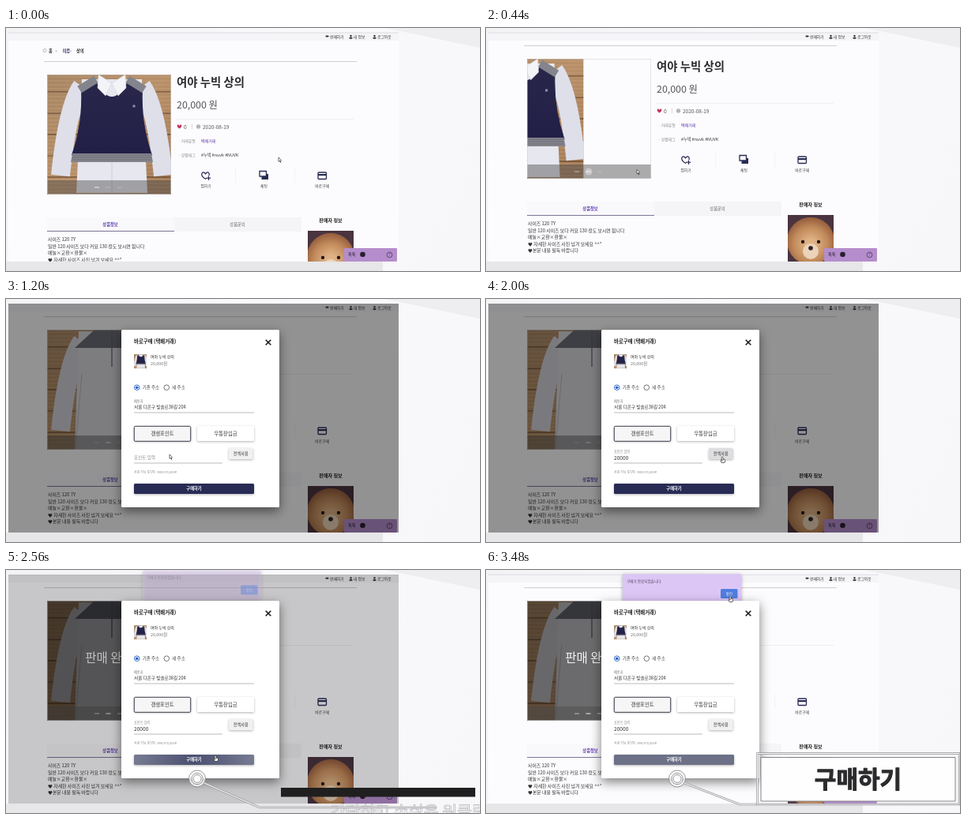
Animation of 600 by 308 pixels, one loop 3.52 s. Source, as an HTML page with a canvas:

```html
<!DOCTYPE html>
<html lang="ko">
<head>
<meta charset="utf-8">
<style>
html, body { margin: 0; width: 100%; height: 100%; overflow: hidden; background: #f7f6f8; }
canvas { display: block; }
</style>
</head>
<body>
<canvas id="stage" width="600" height="308"></canvas>
<script>
const ctx = document.getElementById('stage').getContext('2d');
const LOOP = 3520, STEP = 40;
const NAVY = '#282b54', PURPLE = '#5f3dae', PAPER = '#fcfbfd', INK = '#333', FAINT = '#efeef2';
const PHOTO = { x: 52, y: 59, w: 157, h: 152 };
const ITEM = '여야 누빅 상의', PRICE = '20,000', PAY = '구매하기';

const clamp = v => Math.max(0, Math.min(1, v));
const ramp = (t, a, b) => clamp((t - a) / (b - a));
const ease = p => p * p * (3 - 2 * p);
const move = (t, a, b) => ease(ramp(t, a, b));
const mix = (a, b, p) => a + (b - a) * p;

function trace(build, fill, stroke, width = 1) {
  ctx.beginPath();
  build();
  if (fill) { ctx.fillStyle = fill; ctx.fill(); }
  if (stroke) { ctx.strokeStyle = stroke; ctx.lineWidth = width; ctx.stroke(); }
}

const box = (x, y, w, h, fill, stroke, width, r = 0) =>
  trace(() => ctx.roundRect(x, y, w, h, r), fill, stroke, width);
const disc = (x, y, r, fill, stroke, width) =>
  trace(() => ctx.arc(x, y, r, 0, 2 * Math.PI), fill, stroke, width);
const line = (x0, y0, x1, y1, color, width) =>
  trace(() => { ctx.moveTo(x0, y0); ctx.lineTo(x1, y1); }, null, color, width);
const poly = (points, fill, stroke, width) =>
  trace(() => { points.forEach(p => ctx.lineTo(...p)); ctx.closePath(); }, fill, stroke, width);
const rule = (x0, x1, y, color = FAINT, width = 1) => line(x0, y, x1, y, color, width);

// y is the vertical middle of the glyphs
function text(s, x, y, size, color = INK, weight = 400, align = 'left') {
  ctx.font = `${weight} ${size}px "Noto Sans CJK KR", "Noto Sans CJK", sans-serif`;
  ctx.textAlign = align;
  ctx.fillStyle = color;
  ctx.fillText(s, x, y + size * 0.37);
}
const centered = (s, x, y, size, color, weight) => text(s, x, y, size, color, weight, 'center');

function group(draw, alpha = 1, dx = 0, dy = 0, scale = 1) {
  if (alpha <= 0) return;
  ctx.save();
  ctx.globalAlpha *= alpha;
  ctx.translate(dx, dy);
  ctx.scale(scale, scale);
  draw();
  ctx.restore();
}

function clipped(x, y, w, h, draw) {
  ctx.save();
  ctx.beginPath();
  ctx.rect(x, y, w, h);
  ctx.clip();
  draw();
  ctx.restore();
}

function raised(blur, alpha, draw) {
  ctx.save();
  ctx.shadowColor = `rgba(0,0,0,${alpha})`;
  ctx.shadowBlur = blur;
  ctx.shadowOffsetY = blur / 3;
  draw();
  ctx.restore();
}

function gradient(x0, y0, x1, y1, ...colors) {
  const g = ctx.createLinearGradient(x0, y0, x1, y1);
  colors.forEach((c, i) => g.addColorStop(i / (colors.length - 1), c));
  return g;
}

function heart(x, y, s, fill, stroke) {
  trace(() => {
    ctx.moveTo(x, y + s);
    for (const side of [-1, 1]) {
      const top = side < 0 ? y - s / 2 : y + s;
      if (side < 0) ctx.bezierCurveTo(x - s * 2, y - s * 0.2, x - s * 0.8, y - s * 1.7, x, top);
      else ctx.bezierCurveTo(x + s * 0.8, y - s * 1.7, x + s * 2, y - s * 0.2, x, top);
    }
  }, fill, stroke, 1.2);
}

function backdrop() {
  box(0, 0, 600, 308, gradient(0, 0, 600, 308, '#f3f2f4', '#f9f8fa', '#f7f6f8'));
  poly([[480, 0], [600, 0], [600, 25]], '#eeedf0');
  box(0, 296, 477, 12, '#e7e6e9');
}

// Garments are built around a vertical centre line at x = 0.
const trapezoid = (y0, half0, y1, half1, fill) =>
  poly([[-half0, y0], [half0, y0], [half1, y1], [-half1, y1]], fill);

function mirrored(draw) {
  for (const side of [-1, 1]) {
    ctx.save();
    ctx.scale(side, 1);
    draw();
    ctx.restore();
  }
}

function sleeves(color) {
  mirrored(() => trace(() => {
    ctx.moveTo(38, 15);
    ctx.quadraticCurveTo(56, 40, 65, 128);
  }, null, color, 24));
}

function wood(w, h) {
  box(0, 0, w, h, gradient(0, 0, w, h, '#a78664', '#b78f68', '#a17855'));
  for (let y = 22; y < h; y += 27) rule(0, w, y, 'rgba(70,42,25,.55)', 1.4);
  for (let y = 3; y < h; y += 5) rule(0, w, y, 'rgba(235,205,165,.16)', 1.5);
}

function shirtFront() {
  sleeves('#dedfe9');
  trapezoid(6, 38, 150, 45, '#e6e7ef');
  line(0, 110, 0, 150, '#c8c9d4', 0.8);
  trace(() => {
    ctx.moveTo(-22, 4);
    ctx.quadraticCurveTo(0, 52, 22, 4);
    ctx.lineTo(39, 18);
    ctx.quadraticCurveTo(37, 62, 51, 102);
    ctx.lineTo(-51, 102);
    ctx.quadraticCurveTo(-37, 62, -39, 18);
  }, gradient(0, 0, 0, 105, '#2a274a', '#211f47'));
  trapezoid(100, 50, 111, 52, '#85858e');
  for (let y = 102; y < 111; y += 3) rule(-50, 50, y, '#66666f', 0.8);
  mirrored(() => {
    line(20, 6, 41, 19, '#83848c', 10);
    poly([[0, 11], [17, 0], [18, 17], [8, 27]], '#f3f3f8', '#c9cad6', 0.5);
  });
  disc(28, 40, 1.8, '#8c8ca8');
}

function shirtBack() {
  sleeves('#d2d2d8');
  trapezoid(2, 42, 152, 47, '#d7d7dc');
  trapezoid(0, 22, 23, 47, '#6b6c75');
  line(0, 0, 0, 47, '#5c5c66', 1.2);
  mirrored(() => line(38, 55, 46, 150, '#b3b3ba', 0.9));
}

function photo(garment) {
  wood(PHOTO.w, PHOTO.h);
  group(garment, 1, 82, 0);
}

function carousel(t) {
  const { x, y, w, h } = PHOTO;
  const slid = t >= 520;
  box(x, y, w, h, PAPER);
  clipped(x, y, w, h, () => {
    const shift = slid ? 0 : move(t, 350, 520) * w;
    clipped(x - shift, y, w, h, () => group(() => photo(slid ? shirtBack : shirtFront), 1, x - shift, y));
    if (t >= 2480) {
      box(x, y, w, h, 'rgba(0,0,0,.5)');
      centered('판매 완료', x + w / 2, 131, 15.5, '#f4f4f4');
    }
    box(x, y + h - 18, w, 18, 'rgba(75,75,75,.45)');
    for (let i = 0; i < 3; i++) rule(112 + i * 14.5, 118 + i * 14.5, 202, i === +(t >= 440) ? '#eee' : '#bbb');
    if (t > 340 && t < 600) disc(130, 202, 4.5, 'rgba(255,255,255,.35)');
  });
  box(x + 0.5, y + 0.5, w - 1, h - 1, null, 'rgba(205,205,210,.5)');
}

function dogPhoto() {
  clipped(382, 257, 58, 60, () => {
    box(382, 257, 58, 60, '#4a3440');
    const fur = ctx.createRadialGradient(411, 294, 6, 411, 294, 32);
    fur.addColorStop(0, '#dfb184');
    fur.addColorStop(0.6, '#c18a5a');
    fur.addColorStop(1, '#9b6241');
    disc(411, 290, 30, fur);
    disc(411, 303, 10, '#ead3b8');
    mirroredEyes(411, 291);
    disc(411, 299, 2.8, '#2b2024');
  });
}

function mirroredEyes(x, y) {
  for (const side of [-1, 1]) disc(x + side * 10, y, 2.2, '#24191a');
}

function cardIcon(x, y) {
  box(x - 5, y - 4, 10.5, 8.5, null, NAVY, 1.3, 1);
  box(x - 5, y - 2, 10.5, 2.2, NAVY);
}

function wishIcon(x, y) {
  heart(x - 0.5, y, 4.3, null, NAVY);
  box(x + 1, y, 6, 6, PAPER);
  line(x + 3.5, y + 0.5, x + 3.5, y + 6, NAVY, 1.2);
  rule(x + 0.8, x + 6.2, y + 3.2, NAVY, 1.2);
}

function talkIcon(x, y) {
  box(x - 3, y - 2, 8.5, 7, NAVY);
  box(x - 5.5, y - 5.5, 8.5, 6.5, PAPER, NAVY, 1.3);
}

function actions() {
  const icons = { 찜하기: wishIcon, 채팅: talkIcon, 바로구매: cardIcon };
  Object.entries(icons).forEach(([label, icon], i) => {
    const x = 253 + i * 73.5;
    icon(x, 187);
    centered(label, x, 200, 4.8, '#444');
    if (i) line(215.5 + i * 75, 178, 215.5 + i * 75, 196, '#f2f1f4');
  });
}

function breadcrumb() {
  disc(49, 28.5, 2, null, '#aaa', 0.8);
  ['홈', '의류', '상의'].forEach((s, i) => {
    text(s, 54 + i * 17.5, 29, 5.2, i === 1 ? '#36286a' : '#222', 600);
    if (i) text('›', 44 + i * 18.5, 28.5, 6, '#555');
  });
  rule(48, 444, 42.5, '#cfced4');
}

function details() {
  text(ITEM, 216, 69, 14.4, '#2b2b2e', 600);
  text(PRICE + ' 원', 216, 97, 12.4, '#555', 300);
  rule(216, 440, 115.5);
  heart(219.5, 125, 2.6, '#c5365f');
  text('0', 225, 125.5, 6.6, '#555');
  line(235.5, 122, 235.5, 128, '#ccc', 0.7);
  disc(243.5, 125, 2.7, '#b5b4bb');
  text('2020-08-19', 249, 125.5, 6.5, '#555');
  text('· 거래유형', 218, 143, 4.9, '#888');
  text('택배거래', 247, 143, 5, PURPLE);
  text('· 상품태그', 218, 161, 4.9, '#888');
  text('#누빅 #nuvk #NUVK', 247, 161, 5.3);
  actions();
}

function description() {
  box(52, 240, 161, 18, '#f9f8fb');
  box(213, 240, 161, 18, '#f5f4f7');
  rule(52, 213, 257.5, '#7d7694');
  centered('상품정보', 132, 249, 5.3, PURPLE, 600);
  centered('상품문의', 293, 249, 5.3, '#666');
  centered('판매자 정보', 411, 244, 6.1, '#222', 600);
  ['사이즈 120 7Y', '일반 120 사이즈 보다 커요 130 정도 보시면 됩니다', '애눌×교환×환불×',
    '♥ 자세한 사이즈 사진 넘겨 보세요 ^^*', '♥본문 내용 필독 바랍니다']
    .forEach((s, i) => text(s, 53, 268.3 + i * 8.4, 5.9, INK));
  dogPhoto();
}

function topBar() {
  box(3, 6, 494, 10, '#f5f4f7');
  rule(3, 497, 6, '#dddce1');
  ['판매하기', '내 정보', '로그아웃'].forEach((s, i) => {
    const x = 410 + i * 30;
    text(s, x, 11.3, 4.8);
    if (i) disc(x - 3.5, 10, 1.2, INK);
    box(x - 5.5, i ? 11.8 : 9.6, 4, 2, INK, null, 0, 0.8);
  });
}

function chatBar() {
  box(428, 279, 67, 17, '#b58dcc', null, 0, 1);
  text('톡톡', 433, 287.5, 5.3, '#2a1c38');
  disc(451.5, 287, 3.3, '#28202f');
  disc(485.5, 287.5, 3.4, null, '#4b3a58', 0.8);
  centered('?', 485.5, 287.5, 5, '#4b3a58');
}

function page(t) {
  box(3, 6, 494, 290, PAPER);
  clipped(3, 16, 494, 280, () => group(() => {
    breadcrumb();
    carousel(t);
    details();
    description();
  }, 1, 0, -20 * move(t, 40, 240)));
  topBar();
  chatBar();
}

function choicePopup() {
  raised(9, 0.4, () => box(197, 136, 98, 31, gradient(197, 0, 295, 0, '#fff', '#f9f9f9', '#ededed'), null, 0, 1.5));
  text('택배거래', 228, 152, 6.9);
  box(254, 148.5, 6, 6, null, NAVY, 1.1);
  box(260, 150.5, 4, 4, null, NAVY, 1.1);
  for (const x of [256.3, 261.8]) disc(x, 155, 1.4, NAVY);
}

function radio(x, label, on) {
  const color = on ? '#1c5fc4' : '#666';
  disc(x, 112.2, 3.3, null, color, 0.9);
  if (on) disc(x, 112.2, 1.8, color);
  text(label, x + 7, 112.3, 5.5, '#444');
}

function button(x, y, w, h, label, size, fill, color = INK, weight = 400) {
  raised(3, 0.3, () => box(x, y, w, h, fill, null, 0, 1.5));
  centered(label, x + w / 2, y + h / 2, size, color, weight);
}

function payDialog(t) {
  raised(14, 0.5, () => box(146, 39, 200, 225, '#fff', null, 0, 1.5));
  text('바로구매 (택배거래)', 162, 54, 6.4, '#222', 600);
  for (const d of [-3.3, 3.3]) line(332 - d, 51.7, 332 + d, 58.3, '#111', 1.5);
  clipped(162, 70, 16, 18, () => group(() => photo(shirtFront), 1, 161, 70, 0.118));
  text(ITEM, 183, 73.5, 5);
  text(PRICE + '원', 183, 82, 5.3, '#777');
  radio(165.7, '기존 주소', true);
  radio(203.3, '새 주소', false);
  text('배송지', 162, 129, 4.2, '#777');
  text('서울 다온구 빛솔로38길 204', 162, 137, 5.6);
  rule(162, 314, 144, '#aaa', 0.8);
  button(162, 161, 72, 19, '갱생포인트', 6.3, '#f6f6f7');
  box(162.3, 161.3, 71.4, 19, null, '#3d3e4a', 1, 1.5);
  button(242, 161, 72, 19, '무통장입금', 6.3, '#fff');

  const float = move(t, 1840, 1920);
  text('포인트 입력', 162, mix(201, 193, float), mix(5.6, 4.2, float), '#888');
  if (float > 0) text('20000', 162, 201.3, 6.6);
  rule(162, 274, 208, '#aaa', 0.8);
  button(282, 189, 30.5, 14, '전액사용', 5.2, t > 1760 && t < 2160 ? '#dedee0' : '#f1f1f2');
  text('사용 가능 포인트 :999,970,000P', 162, 220, 4, '#888');

  const press = ramp(t, 2400, 2640);
  const ripple = () => gradient(162, 0, 314, 0, '#777b92', '#4b4f70', '#777b92');
  button(162, 234, 152, 13, PAY, 5.3, press === 0 ? NAVY : press < 1 ? ripple() : '#6d7188', '#fff', 600);
}

function alertBox() {
  raised(4, 0.35, () => box(173, 5, 150, 37.5, '#dcc6f6', null, 0, 2));
  text('구매가 완료되었습니다.', 178, 14, 4.6, '#54495f');
  box(297, 24, 21.5, 12, '#4f7de0', null, 0, 1.5);
  centered('확인', 307.7, 30, 4.6, '#fff');
}

function subtitle() {
  text('간단하고 손쉬운 원클릭', 411, 0, 20.5, '#f8f8f9');
  ctx.lineWidth = 0.7;
  ctx.strokeStyle = '#b5b4b9';
  ctx.strokeText('간단하고 손쉬운 원클릭', 411, 20.5 * 0.37);
}

function callout(t) {
  const grow = move(t, 2360, 2480);
  if (grow <= 0) return;
  const open = move(t, 2560, 2760);
  const lift = move(t, 2460, 2560) * (1 - move(t, 2600, 2720));
  group(subtitle, lift, 0, mix(318, 306, lift));

  const endY = mix(301, 297, open), endX = mix(600, 343, open);
  clipped(250, 260, 350 * move(t, 2440, 2600), 48, () => {
    for (const [color, width] of [['#99989d', 2.6], ['#f7f7f8', 1.2]]) {
      line(251, 270, 321, endY, color, width);
      rule(321, endX, endY, color, width);
    }
  });
  for (const r of [10.5, 7.2, 5]) disc(242, 264.5, r * grow, 'rgba(255,255,255,.75)', '#88878c', 0.9);

  clipped(340, mix(310, 229, open), 260, 80, () => {
    box(343.5, 232.5, 255.5, 64.5, null, '#8f8e93', 2.4);
    box(343.5, 232.5, 255.5, 64.5, null, '#fafafa', 1);
  });
  const top = mix(276, 237.5, open), height = mix(11.5, 55.5, open);
  const tone = mix(31, 254, open);
  const width = 246 * move(t, 2480, 2560);
  box(348, top, width, height, `rgb(${tone},${tone},${tone})`, open ? '#77767b' : null, 0.9);
  clipped(348, top, width, height, () =>
    group(() => {
      centered(PAY, 471, 264.5, 30, '#2b2b2d', 900);
      ctx.lineJoin = 'round';
      ctx.lineWidth = 1;
      ctx.strokeStyle = '#2b2b2d';
      ctx.strokeText(PAY, 471, 264.5 + 30 * 0.37);
    }, ramp(open, 0.3, 1)));
}

// The pointer spends TRAVEL ms getting to each stop, then rests there.
const TRAVEL = 260;
const STOPS = [
  { at: 0, x: 345, y: 164 },
  { at: 320, x: 130, y: 183, hand: true },
  { at: 620, x: 400, y: 167, hand: true },
  { at: 940, x: 245, y: 153, hand: true },
  { at: 1200, x: 207, y: 197 },
  { at: 1760, x: 299, y: 200, hand: true },
  { at: 2400, x: 265, y: 235, hand: true },
  { at: 3240, x: 309, y: 33, hand: true },
];

function handShape() {
  box(-1.5, 3, 5, 4.5, '#fff', '#222', 0.7, 1.5);
  box(-0.8, 0, 1.8, 5, '#fff', '#222', 0.6, 0.9);
}

function arrowShape() {
  line(1.6, 4, 2.8, 6.5, '#333', 1.1);
  poly([[0, 0], [0, 5.2], [3.6, 3.8]], '#fff', '#333', 0.7);
}

function cursor(t) {
  let pos = STOPS[0];
  for (const stop of STOPS.slice(1)) {
    const p = move(t, stop.at - TRAVEL, stop.at);
    if (p > 0) pos = { x: mix(pos.x, stop.x, p), y: mix(pos.y, stop.y, p), hand: p === 1 && stop.hand };
  }
  group(pos.hand ? handShape : arrowShape, 1, pos.x, pos.y);
}

function draw(t) {
  backdrop();
  page(t);
  const dim = 0.42 * ramp(t, 620, 740) * (1 - ramp(t, 2480, 2640));
  box(3, 6, 494, 290, `rgba(0,0,0,${dim})`);
  group(choicePopup, ramp(t, 620, 720) * (1 - ramp(t, 1000, 1080)));
  const notice = ramp(t, 2480, 2680);
  group(alertBox, notice, 0, -8 * (1 - notice));
  group(() => payDialog(t), ramp(t, 1040, 1140));
  cursor(t);
  callout(t);
}

function tick(now) {
  draw(Math.floor((now % LOOP) / STEP) * STEP);
  requestAnimationFrame(tick);
}
draw(0);
requestAnimationFrame(tick);
</script>
</body>
</html>
```
